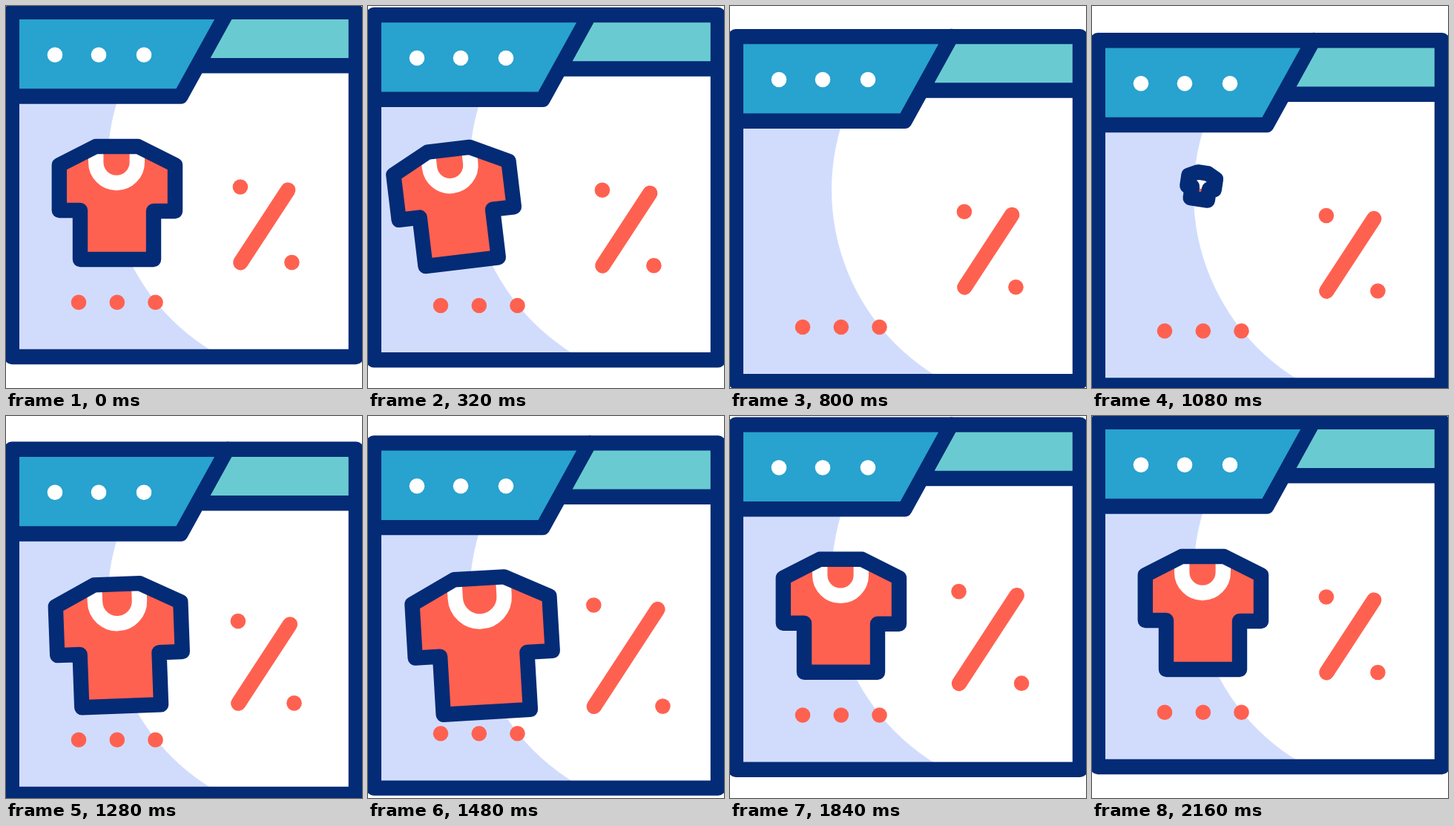
These frames come from a looping animation (480x514 px, 2.28 s). An HTML page with a canvas:

```html
<!DOCTYPE html>
<html lang="en">
<head>
<meta charset="utf-8">
<title>Shop window</title>
<style>
html, body { margin: 0; width: 100%; height: 100%; overflow: hidden; background: #fff; }
canvas { display: block; width: 480px; height: 514px; }
</style>
</head>
<body>
<canvas id="stage" width="480" height="514"></canvas>
<script>
const ctx = document.getElementById('stage').getContext('2d');
const LOOP = 2280, STEP = 40, LINE = 20.4, DOT = 10.3;
const NAVY = '#042b76', RED = '#ff6150', BLUE = '#28a2ce';
const TEAL = '#69cbd1', LILAC = '#d1dcfd', WHITE = '#fff';

// Cubic bezier easing with control points (a, 0) and (b, 1).
function bezier(a, b) {
  return x => {
    if (x <= 0) return 0;
    if (x >= 1) return 1;
    let lo = 0, hi = 1;
    for (let i = 0; i < 30; i++) {
      const t = (lo + hi) / 2, u = 1 - t;
      if (3 * u * u * t * a + 3 * u * t * t * b + t * t * t < x) lo = t;
      else hi = t;
    }
    return lo * lo * (3 - 2 * lo);
  };
}
const even = bezier(0.52, 0.48);
const soft = bezier(0.56, 0.33);
const phase = (t, from, to, ease = even) => ease((t - from) / (to - from));

function poly(points, close) {
  points.forEach(([x, y], i) => i ? ctx.lineTo(x, y) : ctx.moveTo(x, y));
  if (close) ctx.closePath();
}

function fillPoly(color, points) {
  ctx.beginPath();
  poly(points, true);
  ctx.fillStyle = color;
  ctx.fill();
}

function stroke(color, cap = 'round') {
  ctx.strokeStyle = color;
  ctx.lineCap = cap;
  ctx.stroke();
}

function disc(color, x, y, r = DOT) {
  ctx.beginPath();
  ctx.arc(x, y, r, 0, Math.PI * 2);
  ctx.fillStyle = color;
  ctx.fill();
}

const SHIRT = [[121, 189], [178, 189], [228, 214], [228, 276], [199, 276],
               [199, 341], [100, 341], [100, 275], [71.8, 275], [71.8, 214]];

// Only the path is transformed, so line weights stay constant.
function shaped(pose, build) {
  ctx.save();
  ctx.translate(149.6 + pose.x, 185);
  ctx.rotate(pose.turn * Math.PI / 180);
  ctx.scale(pose.size, pose.size);
  ctx.translate(-149.6, -185);
  ctx.beginPath();
  build();
  ctx.restore();
}

function shirtPose(t) {
  if (t < 920) {
    return { x: -363 * phase(t, 40, 1100), turn: -9 * phase(t, 40, 480), size: 1 };
  }
  const grow = phase(t, 920, 1400), settle = phase(t, 1400, 1780);
  return {
    x: 0,
    turn: 11.3 - 14.9 * grow + 3.6 * settle,
    size: Math.max(0.001, 1.2 * grow - 0.2 * settle)
  };
}

function drawShirt(t) {
  const pose = shirtPose(t);
  const outline = () => poly(SHIRT, true);
  shaped(pose, outline);
  ctx.fillStyle = RED;
  ctx.fill();
  shaped(pose, () => {
    ctx.moveTo(121.2, 189);
    ctx.lineTo(121.2, 210.2);
    ctx.arc(149, 210.2, 27.8, Math.PI, 0, true);
    ctx.lineTo(176.8, 189);
  });
  stroke(WHITE, 'butt');
  shaped(pose, outline);
  stroke(NAVY);
}

function drawPercent(t) {
  const size = 1 + 0.375 * (phase(t, 1100, 1600) - phase(t, 1600, 2160, soft));
  const at = (x, y) => [350 + (x - 350) * size, 295 + (y - 295) * size];
  disc(RED, ...at(315.9, 243.5));
  disc(RED, ...at(385.4, 345));
  ctx.beginPath();
  poly([at(380.2, 247.6), at(316.3, 345.2)]);
  stroke(RED);
}

function drawBody() {
  ctx.save();
  ctx.beginPath();
  ctx.rect(8, 8, 464, 464);
  ctx.clip();
  ctx.fillStyle = LILAC;
  ctx.fillRect(8, 8, 464, 464);
  disc(WHITE, 430, 214, 293);
  ctx.fillStyle = WHITE;
  ctx.fillRect(430, 8, 50, 464);
  ctx.fillRect(276, 430, 0, 0);
  ctx.beginPath();
  ctx.restore();
}

function drawFrame() {
  fillPoly(TEAL, [[298, 8], [472, 8], [472, 80], [258, 80]]);
  fillPoly(BLUE, [[8, 8], [298, 8], [235.5, 121.5], [8, 121.5]]);
  ctx.beginPath();
  poly([[7.8, 121.5], [235.5, 121.5], [298.5, 7.6]]);
  poly([[262, 80.2], [472, 80.2]]);
  poly([[7.8, 7.8], [472, 7.8], [472, 472], [7.8, 472]], true);
  stroke(NAVY);
  [66, 125, 186].forEach(x => disc(WHITE, x, 65.7));
}

function draw(t) {
  const drop = 38.5 * (phase(t, 45, 1100) - phase(t, 1100, 2160, soft));
  ctx.fillStyle = WHITE;
  ctx.fillRect(0, 0, 480, 514);
  ctx.save();
  ctx.translate(0, drop);
  ctx.lineWidth = LINE;
  ctx.lineJoin = 'round';
  drawBody();
  [98, 149.8, 201.5].forEach(x => disc(RED, x, 398.7));
  drawPercent(t);
  drawShirt(t);
  drawFrame();
  ctx.restore();
}

function tick(now) {
  draw(Math.floor((now % LOOP) / STEP) * STEP);
  requestAnimationFrame(tick);
}
draw(0);
requestAnimationFrame(tick);
</script>
</body>
</html>
```
